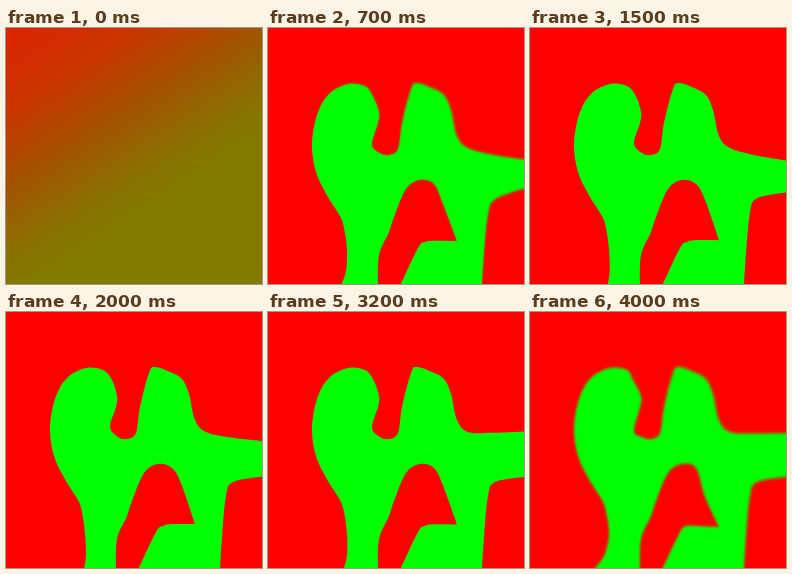
An HTML page with a canvas for the animation above (4100 ms loop, 256 by 256 pixels).

```html
<!DOCTYPE html>
<html lang="en">
<head>
<meta charset="utf-8">
<title>Decision boundary</title>
<style>
  html, body { margin: 0; width: 100%; height: 100%; overflow: hidden; background: #f00; }
  canvas { display: block; width: 100vw; height: 100vh; }
</style>
</head>
<body>
<canvas id="stage" width="256" height="256"></canvas>
<script>
const SIZE = 256, FAR = 340, STEP = 100, STEPS = 41;
const FIRST = 3, CALM = 26, LAST = 40;

const ctx = document.getElementById('stage').getContext('2d');
const layer = document.createElement('canvas');
layer.width = layer.height = SIZE;
const soft = layer.getContext('2d');

function gradient(c, x0, y0, x1, y1, stops) {
  const g = c.createLinearGradient(x0, y0, x1, y1);
  stops.forEach(([at, color]) => g.addColorStop(at, color));
  return g;
}

const field = gradient(ctx, 0, 0, 122, 190, [
  [0, '#dc2300'], [0.3, '#cc3300'], [0.6, '#a35300'], [0.85, '#8a7000'], [1, '#827a00']
]);
const rightSide = gradient(soft, 115, 150, 175, 100, [[0, '#0000'], [1, '#000']]);

// The boundary settles, rests, then grows restless again while the bar sways.
function poseAt(step) {
  const settle = Math.exp(-Math.max(0, step - FIRST) / 4);
  const unrest = Math.max(0, (step - CALM) / (LAST - CALM)) ** 2;
  return {
    settle,
    loose: settle + unrest,
    bar: 126 + 7 * Math.cos(2 * Math.PI * (step - 12) / 45)
  };
}

// Key points of the left and top edge, the right leg and the inner arch.
function edges({ loose, settle, bar }) {
  const top = [
    [78 - 15 * loose, 258], [80 - 6 * loose, 244], [79, 222], [76, 200], [72, 188], [60, 169],
    [48, 144], [44, 115], [50, 84], [62, 65], [80, 56], [97, 58],
    [106 - 3 * loose, 68], [111, 84], [110, 95], [104, 115 + 4 * loose], [112, 125], [121, 127],
    [130, 121], [134, 95], [143, 61], [149, 55], [164, 60], [176, 67], [183, 82], [189, 108],
    [200, 120], [225, (bar + 122) / 2], [256, bar]
  ];
  const leg = [
    [256, 165 - 12 * settle], [227, 170 + 4 * settle], [220, 184 + 8 * settle], [216, 225], [214, 258]
  ];
  const notch = [189, 212 + 3 * loose];
  const arch = [
    [132, 258], [150, 220], [157, 214], [167, 212 + 2 * loose], notch, notch,
    [175, 171 + 14 * loose], [166, 156], [152, 152], [138, 161], [126, 189], [121, 204],
    [111, 227], [110, 258]
  ];
  return [top, leg, arch];
}

// Smooth curve through the points; a repeated point makes a corner.
function curve(path, pts) {
  const at = i => pts[Math.min(Math.max(i, 0), pts.length - 1)];
  const handle = (i, side) => {
    const sharp = at(i) === at(i + 1) || at(i) === at(i - 1);
    const reach = sharp ? 0 : side / 6;
    return at(i).map((v, axis) => v + reach * (at(i + 1)[axis] - at(i - 1)[axis]));
  };
  path.lineTo(...pts[0]);
  for (let i = 0; i < pts.length - 1; i++) {
    path.bezierCurveTo(...handle(i, 1), ...handle(i + 1, -1), ...pts[i + 1]);
  }
}

function outline(pose) {
  const [top, leg, arch] = edges(pose);
  const path = new Path2D();
  path.moveTo(top[0][0], FAR);
  curve(path, top);
  path.lineTo(FAR, top.at(-1)[1]);
  path.lineTo(FAR, leg[0][1]);
  curve(path, leg);
  path.lineTo(leg.at(-1)[0], FAR);
  path.lineTo(arch[0][0], FAR);
  curve(path, arch);
  path.lineTo(arch.at(-1)[0], FAR);
  path.closePath();
  return path;
}

function paint(c, path, blur) {
  c.fillStyle = '#f00';
  c.fillRect(0, 0, SIZE, SIZE);
  c.filter = `blur(${blur}px)`;
  c.fillStyle = '#0f0';
  c.fill(path);
  c.filter = 'none';
}

// The untrained field fades while the boundary sharpens.
function drawWarmup(step, path) {
  paint(ctx, path, 26 / (1 + step * step));
  ctx.globalAlpha = (1 - step / FIRST) ** 2;
  ctx.fillStyle = field;
  ctx.fillRect(0, 0, SIZE, SIZE);
  ctx.globalAlpha = 1;
}

// Both sides soften with unrest, the right one more.
function drawTrained(path, loose) {
  paint(ctx, path, 0.35 + 0.45 * loose);
  paint(soft, path, 0.4 + 1.3 * loose);
  soft.globalCompositeOperation = 'destination-in';
  soft.fillStyle = rightSide;
  soft.fillRect(0, 0, SIZE, SIZE);
  soft.globalCompositeOperation = 'source-over';
  ctx.drawImage(layer, 0, 0);
}

function draw(step) {
  const pose = poseAt(step);
  const path = outline(pose);
  if (step < FIRST) drawWarmup(step, path);
  else drawTrained(path, pose.loose);
}

const begin = performance.now();
let shown = -1;
function tick() {
  const step = Math.floor(Math.max(0, performance.now() - begin) / STEP) % STEPS;
  if (step !== shown) draw(shown = step);
  requestAnimationFrame(tick);
}
tick();
</script>
</body>
</html>
```
